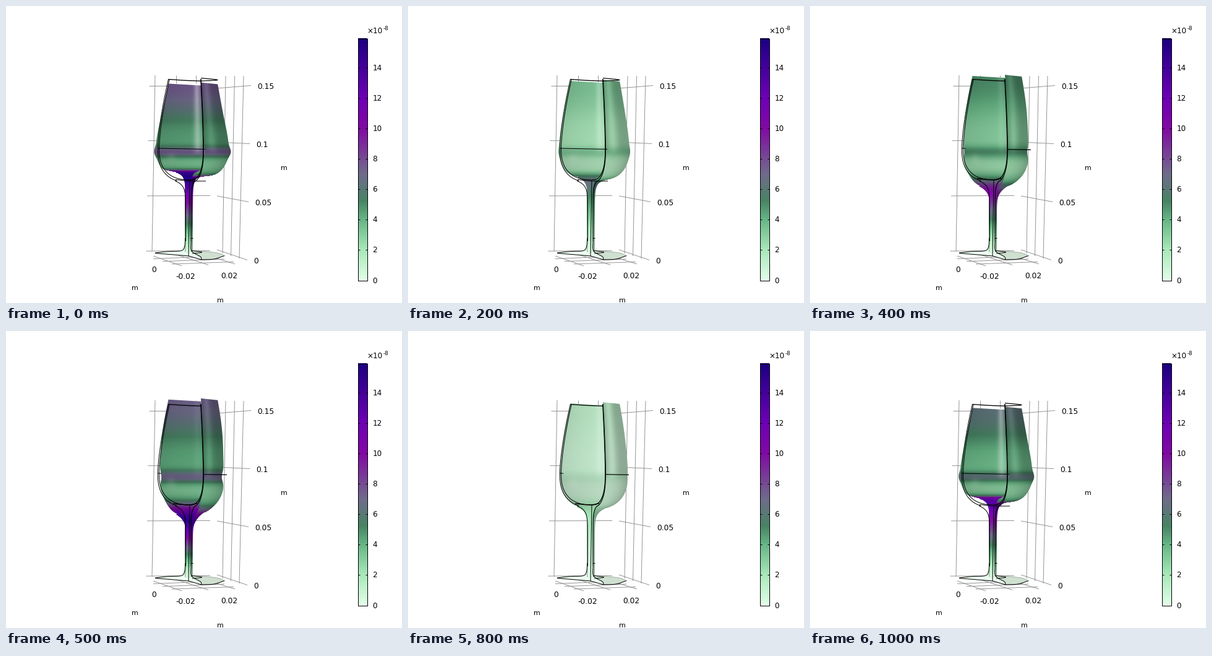
Recreate the animation shown at these times as a matplotlib script. Size 640 by 480 pixels, loop 1.1 s.

```python
import numpy as np
import matplotlib.pyplot as plt
from matplotlib.animation import FuncAnimation
from matplotlib.colors import LinearSegmentedColormap
from matplotlib.patches import Polygon, Rectangle

W, H, DPI = 640, 480, 100
PX = 72 / DPI
FRAMES, STEP = 11, 100
VMAX = 15.93
AXIS = 298

plt.rcParams["font.family"] = "DejaVu Sans"
fig = plt.figure(figsize=(W / DPI, H / DPI), dpi=DPI, facecolor="white")
ax = fig.add_axes([0, 0, 1, 1])
ax.axis("off")

STOPS = {0: "#e1ffe8", 2: "#a8e8b9", 4: "#65b585", 5.2: "#488464",
         7: "#706c8c", 10: "#820aa5", 12: "#6e00b6", VMAX: "#1c0082"}
aurora = LinearSegmentedColormap.from_list(
    "aurora", [(v / VMAX, c) for v, c in STOPS.items()], N=512)


def unit(a):
    return np.clip(a, 0, 1)


def smooth(*pts, n=12):
    """Catmull-Rom curve through the points."""
    p = np.array(pts, float)
    p = np.vstack([2 * p[0] - p[1], p, 2 * p[-1] - p[-2]])
    t = np.linspace(0, 1, n, endpoint=False)[:, None]
    out = [0.5 * (2 * b + (c - a) * t + (2 * a - 5 * b + 4 * c - d) * t**2
                  + (3 * b - a - 3 * c + d) * t**3)
           for a, b, c, d in zip(p, p[1:], p[2:], p[3:])]
    return np.vstack(out + [p[-2:-1]])


def line(pts, color="black", lw=1.0, z=5):
    p = np.asarray(pts, float)
    return ax.plot(p[:, 0], p[:, 1], color=color, lw=lw * PX, zorder=z,
                   solid_capstyle="butt")[0]


def label(x, y, s, ha="center", size=12.0):
    ax.text(x, y, s, ha=ha, va="baseline", fontsize=size * PX)


# ---- undeformed glass in screen space -------------------------------------
def bowl(y, mid, wide, taper, depth=55):
    """Half width: tapered above the middle, superellipse below it."""
    up = unit((mid - y) / 114)
    down = unit((y - mid) / depth)
    return (wide - taper * up**1.5) * (1 - down**2.5)**0.4


def profile(y, mid, wide, taper, stem):
    neck = stem + 0.33 * wide * np.exp(-np.clip(y - mid - 52.5, 0, None) / 7)
    return np.where(y < mid + 52.5, bowl(y, mid, wide, taper), neck)


def left(y):
    return AXIS - profile(y, 230, 52.7, 17.7, 7.7)


def right(y):
    return AXIS + profile(y, 232, 58, 14, 4)


def front(y):
    return AXIS + profile(y, 230, 21.3, 4.3, 1)


# ---- mode shape, one pixel per colour unit --------------------------------
def dz(y, neck=276):
    rim = 7.5 * np.cos(np.pi / 2 * (y - 115) / 122)
    stem = -16 * unit((400 - y) / 108)**1.2
    w = 1 / (1 + np.exp((neck - y) / 4.5))
    return (1 - w) * rim + w * stem


def dr(y):
    return 4 * np.exp(-((y - 225) / 45)**2) + 3.7 * np.exp(-((y - 236) / 10)**2)


X0, X1, Y0, Y1 = 225, 380, 100, 410
xs = np.arange(X0, X1)[None, :] + 0.5
ys = np.arange(Y0, Y1) + 0.5
grid = np.arange(85, 435, 0.5)


def layer(s, inside):
    """Colour and coverage of the inner (left) or outer (right) wall."""
    neck = 276 if inside else 286
    y = np.interp(ys, grid + s * dz(grid, neck), grid)[:, None]
    push = s * dr(y)
    xf = front(y) + 0.15 * push
    low = unit((y - 226) / 16)
    stem = unit((y - 280) / 12)
    if inside:
        xa, xb = left(y) - 0.8 * push, xf
        rim = 118 + 3 * unit((xs - 263) / 52)
        u = unit((xs - xa) / (xb - xa))
        k = 0.84 + 0.1 * u**0.7 - 0.06 * low
        k = k + (1 - k) * stem
        streak = (0.2 + 0.15 * s) * (1 - low) * np.exp(-((u - 0.87) / 0.08)**2)
        spot = 0.1 * np.exp(-((xs - 267)**2 + (y - 245)**2) / 60)
        shine = streak + spot
    else:
        xa, xb = xf - unit((y - 240) / 15) * 10, right(y) + push
        rim = 116 + 3 * unit((xs - 314) / 29)
        u = unit((xs - xf) / (xb - xf))
        k = 0.68 + 0.18 * np.exp(-((u - 0.3) / 0.25)**2)
        k = k + low * (0.85 - 0.18 * u**2 - k)
        k = k + (0.7 - k) * stem
        shine = 0.06 * (1 - low) * np.exp(-((u - 0.3) / 0.15)**2)
    value = abs(s) * np.hypot(dr(y), dz(y, neck)) / VMAX
    rgb = aurora(value)[..., :3] * k[..., None]
    rgb = rgb + (1 - rgb) * shine[..., None]
    cover = (unit(xs - xa + 0.5) * unit(xb - xs + 0.5)
             * unit(y - rim + 0.5) * unit(398 - y))
    return rgb, cover[..., None]


def glass(s):
    back, a = layer(s, False)
    fore, b = layer(s, True)
    alpha = b + a * (1 - b)
    rgb = (fore * b + back * a * (1 - b)) / np.maximum(alpha, 1e-6)
    return np.clip(np.dstack([rgb, alpha]), 0, 1)


# ---- axes grid ------------------------------------------------------------
def rule(*pts):
    line(pts, "#8c8c8c", 0.9, 1)


rule((241, 112), (236, 397))
for x in (275, 307):
    rule((x, 112), (x, 125))
for i, name in enumerate(("0.15", "0.1", "0.05", "0")):
    rule((231 - 1.5 * i, 128.5 + 89.2 * i), (330, 128.5 + 89 * i))
    rule((341, 133 + 87 * i), (396 - 2 * i, 128.5 + 94 * i))
    label(406.5 - 2 * i, 134 + 94 * i, name, "left", 12.3)
for i in range(3):
    rule((355 + 14.5 * i, 113), (350 + 13.5 * i, 400 + 4 * i))
    rule((238 + 35 * i, 404 - 3 * i), (284 + 43 * i, 420 - 1.5 * i))
    rule((238 + 15 * i, 408.5 + 4.3 * i), (338 + 15 * i, 404.5 + 4.5 * i))

label(239, 429.5, "0", size=12.3)
label(289.8, 441, "-0.02", size=12.3)
label(361, 439.5, "0.02", size=12.3)
for x, y in ((449, 265), (208, 459), (346, 479)):
    label(x, y, "m", size=11)

# ---- colour bar -----------------------------------------------------------
BX, BT, BB = 569, 53, 443.5
ax.imshow(np.linspace(1, 0, 391)[:, None], cmap=aurora, aspect="auto",
          extent=(BX, BX + 15, BB, BT), zorder=2)
ax.add_patch(Rectangle((BX, BT), 15, BB - BT, fill=False, lw=PX, zorder=3))
for v in range(0, 16, 2):
    y = BB - v * (BB - BT) / VMAX
    line([(BX, y), (BX + 3, y)])
    line([(BX + 12, y), (BX + 15, y)])
    label(592.3, y + 4, str(v), "left")
label(583.3, 44.5, "×10", "left")
label(609.5, 39, "-8", "left", 8.5)

# ---- foot -----------------------------------------------------------------
foot_top = smooth((241, 399), (262, 396.7), (283, 395.5), (288.5, 389), (289.8, 375))
foot_edge = smooth((316, 410), (336, 409), (353.5, 403.5))
foot_back = smooth((353.5, 403.5), (338, 398.5), (300, 395.5))
foot_cut = smooth((299, 380), (300, 396), (314, 405), (316, 410))
ax.add_patch(Polygon(np.vstack([foot_edge, foot_back, foot_cut[12:]]),
                     fc="#cfe0d0", lw=0, zorder=2))
ax.add_patch(Polygon(np.vstack([foot_top, foot_cut, [(295, 404), (241, 400)]]),
                     fc="#ecfff0", lw=0, zorder=2))
for path in (foot_top, foot_edge, foot_cut):
    line(path)
line(foot_back, "#8fa391", 0.8)
line([(241, 399.5), (295, 404), (316, 410)])
line(smooth((299, 395), (316.5, 398), (301, 400)), lw=0.9)

# ---- undeformed edges -----------------------------------------------------
wall = np.linspace(118, 380, 500)
cavity = np.linspace(118, 281, 400)
line(np.c_[left(wall), wall])
line(np.c_[AXIS - bowl(cavity, 230, 50.5, 17.2, 51), cavity])
line(np.c_[front(wall), wall], lw=1.2)
line(np.c_[AXIS + bowl(cavity, 230, 20.8, 4.2, 51), cavity], lw=1.2)
line([(297, 282), (295, 404)])
line([(298, 375), (302, 375)])
line(smooth((263, 118.5), (290, 120.3), (315.5, 121.2)), lw=1.3)

squeezed = [
    line([(246, 230), (322, 231.5)]),
    line(smooth((315, 116.5), (342, 119.5), (315.5, 121.2)), lw=1.2),
    line(smooth((274, 280.5), (297, 282.8), (323, 283))),
]
stretched = [
    line([(319, 231.8), (357, 232.4)], lw=1.2),
    line([(245, 229.8), (251, 230.2)]),
    line(smooth((270, 279), (295, 281), (309, 278.5)), lw=1.5),
]

body = ax.imshow(glass(1), extent=(X0, X1, Y1, Y0), interpolation="nearest",
                 aspect="auto", zorder=4)
ax.set_xlim(0, W)
ax.set_ylim(H, 0)


def draw(i):
    s = np.cos(2 * np.pi * i / FRAMES)
    body.set_data(glass(s))
    for art in squeezed:
        art.set_visible(s > 0)
    for art in stretched:
        art.set_visible(s < 0)
    return [body, *squeezed, *stretched]


anim = FuncAnimation(fig, draw, frames=FRAMES, interval=STEP, repeat=True,
                     repeat_delay=0, blit=False)
plt.show()
```
